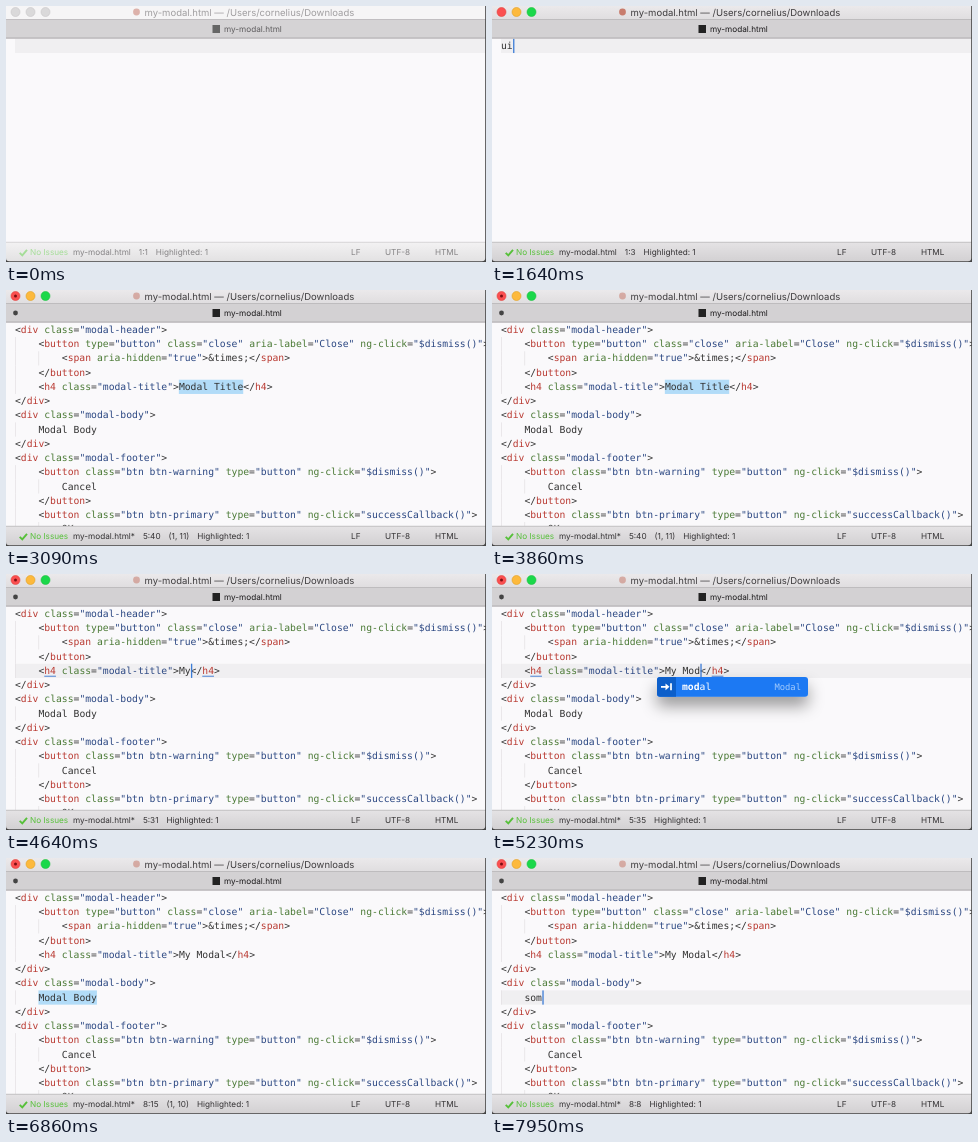
An HTML page that plays this animation: 480 px wide and 256 px high, repeating every 8 s.

```html
<!DOCTYPE html>
<html lang="en">
<head>
<meta charset="utf-8">
<title>Editor snippet demo</title>
<style>
html, body { margin: 0; width: 100%; height: 100%; overflow: hidden; background: #faf9fb; }
svg { display: block; width: 100vw; height: 100vh; }
text { white-space: pre; text-rendering: geometricPrecision; }
.ui { font: 8.2px Inter, sans-serif; }
.title { font: 9.5px Inter, sans-serif; }
.code { font: 9.72px "DejaVu Sans Mono", monospace; }
</style>
</head>
<body>
<svg id="stage" viewBox="0 0 480 256" xmlns="http://www.w3.org/2000/svg">
  <defs>
    <linearGradient id="titleFill" x2="0" y2="1">
      <stop stop-color="#ebe9eb"/><stop offset="1" stop-color="#dfdddf"/>
    </linearGradient>
    <linearGradient id="statusFill" x2="0" y2="1">
      <stop stop-color="#e5e3e5"/><stop offset="1" stop-color="#d2d0d2"/>
    </linearGradient>
    <linearGradient id="idleFill" x2="0" y2="1">
      <stop stop-color="#f3f2f3"/><stop offset="1" stop-color="#e2e1e2"/>
    </linearGradient>
    <filter id="shadow" x="-20%" y="-100%" width="140%" height="420%">
      <feDropShadow dx="0" dy="9" stdDeviation="8" flood-opacity=".4"/>
    </filter>
  </defs>
  <g id="editor"></g>
  <g id="chrome"></g>
  <path d="M0 0H480V256H0ZM0 0V252q0 3.2 3.2 3.2H476q3.2 0 3.2-3.2V0Z" fill="#444" fill-rule="evenodd"/>
</svg>
<script>
const LOOP = 8000, LEFT = 9, TOP = 32.8, ROW = 14.23, CW = 5.852;
const FOCUS = 500, EXPAND = 2760, NEXT_STOP = 6480;

const trigger = { text: 'uibmo', at: [1500, 1600, 1800, 2010, 2190] };
const heading = { text: 'My Modal', at: [4400, 4530, 4660, 4820, 4960, 5120, 5330, 5470] };
const content = { text: 'som', at: [7560, 7720, 7880] };

const colors = { plain: '#333', tag: '#b93a32', attr: '#4b7a36', string: '#2b4782' };
const editor = document.getElementById('editor');
const chrome = document.getElementById('chrome');

const colX = col => LEFT + col * CW;
const rowY = row => TOP + row * ROW;
const escapeXml = s => s.replace(/&/g, '&amp;').replace(/</g, '&lt;').replace(/>/g, '&gt;');
const rect = (x, y, w, h, fill, extra = '') =>
  `<rect x="${x}" y="${y}" width="${w}" height="${h}" fill="${fill}" ${extra}/>`;
const text = (x, y, body, fill, cls = 'ui', extra = '') =>
  `<text x="${x}" y="${y}" fill="${fill}" class="${cls}" ${extra}>${body}</text>`;
const span = (s, fill, extra = '') => `<tspan fill="${fill}" ${extra}>${escapeXml(s)}</tspan>`;

const typed = ({ text, at }, t) => text.slice(0, at.filter(time => time <= t).length);

const snippet = (title, body) => [
  '<div class="modal-header">',
  '    <button type="button" class="close" aria-label="Close" ng-click="$dismiss()">',
  '        <span aria-hidden="true">&times;</span>',
  '    </button>',
  `    <h4 class="modal-title">${title}</h4>`,
  '</div>',
  '<div class="modal-body">',
  `    ${body}`,
  '</div>',
  '<div class="modal-footer">',
  '    <button class="btn btn-warning" type="button" ng-click="$dismiss()">',
  '        Cancel',
  '    </button>',
  '    <button class="btn btn-primary" type="button" ng-click="successCallback()">',
  '        OK'
];

function highlight(line) {
  const token = /(<\/?)(\w+)|("[^"]*")|([\w-]+)(?==)|([^<"\w]+|\w+)/g;
  return line.replace(token, (all, open, tag, string, attr) => {
    if (tag) return span(open, colors.plain) + span(tag, colors.tag);
    if (string) return span(string, colors.string);
    return span(all, attr ? colors.attr : colors.plain);
  });
}

function stateAt(t) {
  const s = { active: t >= FOCUS, dirty: t >= 1720, lines: [''], row: 0, col: 0, selected: 0 };
  if (t < EXPAND) {
    s.lines = [typed(trigger, t)];
    s.col = s.lines[0].length;
    if (t >= 1900) s.popup = { row: 0, x: 0, width: 244.5, match: s.lines[0].length };
  } else {
    const title = typed(heading, t), body = typed(content, t);
    s.lines = snippet(title || 'Modal Title', body || 'Modal Body');
    if (t < NEXT_STOP) {
      s.row = 4;
      s.col = 28 + (title || 'Modal Title').length;
      s.selected = title ? 0 : 11;
      if (t >= 5180 && t < 5800) s.popup = { row: 4, x: 165, width: 151, match: title.length - 3 };
    } else {
      s.row = 7;
      s.col = 4 + (body || 'Modal Body').length;
      s.selected = body ? 0 : 10;
    }
  }
  const keys = [FOCUS, EXPAND, NEXT_STOP, ...trigger.at, ...heading.at, ...content.at];
  const last = Math.max(0, ...keys.filter(k => k <= t));
  s.caret = s.active && !s.selected && (t - last) % 800 < 400;
  return s;
}

function drawPopup({ row, x, width, match }) {
  const y = rowY(row + 1) - 0.9, h = 19.8, base = y + 12.9;
  const first = row === 0;
  const word = first ? 'uib-modal-template' : 'modal';
  const bold = first && match > 3 ? match + 1 : match;
  const label = span(word.slice(0, bold), '#fff', 'font-weight="bold"') + span(word.slice(bold), '#fff');
  const hint = first ? 'UI-Bootstrap Moda…' : 'Modal';
  return rect(x, y, width, h, '#1b79f3', 'rx="3" filter="url(#shadow)"') +
    `<path d="M${x + 19} ${y}h-16q-3 0-3 3v${h - 6}q0 3 3 3h16z" fill="#0d5fca"/>` +
    `<path d="M${x + 4} ${y + 9.8}h6M${x + 14} ${y + 6.3}v7" stroke="#fff" stroke-width="1.7"/>` +
    `<path d="M${x + 8.5} ${y + 6.4}l4 3.4-4 3.4z" fill="#fff"/>` +
    text(x + 25, base, label, '#fff', 'code') +
    text(x + width - (first ? 10 : 7), base, hint, '#a3cbfc', 'code', 'text-anchor="end" style="font-size:8.85px"');
}

function drawEditor(s) {
  let out = rect(0, 32, 480, 205, '#faf9fb');
  if (s.selected)
    out += rect(colX(s.col - s.selected), rowY(s.row), s.selected * CW, ROW, '#b2dcf8');
  else
    out += rect(LEFT, rowY(s.row), 471, ROW, '#f0eff1');
  s.lines.forEach((line, i) => {
    const indent = line.search(/\S|$/);
    for (let c = 0; c < indent; c += 4) out += rect(colX(c), rowY(i), 0.7, ROW, '#e2e0e3');
    out += text(LEFT, rowY(i) + 10.2, highlight(line), colors.plain, 'code');
  });
  if (s.row === 4 && !s.selected) {
    for (const c of [5, s.col + 2]) out += rect(colX(c), rowY(4) + 12, CW * 2, 1, '#4a83d4');
  }
  if (s.caret) out += rect(colX(s.col) + 0.4, rowY(s.row), 1.3, ROW, '#3c7cd6');
  if (s.popup) out += drawPopup(s.popup);
  return out;
}

function drawChrome(s) {
  const on = s.active;
  const ink = on ? '#3e3c3e' : '#a09ea0';
  const statusInk = on ? '#343234' : '#858385';
  const lights = on ? ['#fb4f50', '#fdb93c', '#1bd84a'] : ['#dad9da', '#dad9da', '#dad9da'];
  const rims = on ? ['#e0443f', '#dfa023', '#1cc040'] : ['#c8c7c8', '#c8c7c8', '#c8c7c8'];
  let out = rect(0, 0, 480, 14, on ? 'url(#titleFill)' : '#f6f5f6');
  lights.forEach((fill, i) => {
    out += `<circle cx="${9.5 + i * 15}" cy="6" r="4.5" fill="${fill}" stroke="${rims[i]}" stroke-width=".6"/>`;
  });
  if (s.dirty) out += '<circle cx="9.5" cy="6" r="1.5" fill="#7c0f12"/>';
  out += `<circle cx="130.5" cy="6" r="3.4" fill="#c4705f" opacity="${on && !s.dirty ? 0.9 : 0.5}"/>`;
  out += text(138.6, 9.6, 'my-modal.html — /Users/cornelius/Downloads', ink, 'title');

  out += rect(0, 13.5, 480, 18.5, on ? '#d3d1d3' : '#d5d3d5') +
    rect(0, 13, 480, 0.8, '#b8b6b8') + rect(0, 31.6, 480, 1, '#a7a5a7');
  if (s.dirty) out += '<circle cx="9.5" cy="23" r="2.4" fill="#444"/>';
  out += rect(206.5, 19, 7.5, 8, on ? '#222' : '#666') +
    text(218, 26, 'my-modal.html', on ? '#1c1a1c' : '#5f5d5f');

  out += rect(0, 236, 480, 20, on ? 'url(#statusFill)' : 'url(#idleFill)') +
    rect(0, 235.8, 480, 0.8, on ? '#bab8ba' : '#d0ced0');
  const green = on ? '#57c03a' : '#a5dd98';
  out += `<path d="M13.7 246.8l2.6 2.6 4.7-5.6" fill="none" stroke="${green}" stroke-width="1.9"/>` +
    text(24, 249.4, 'No Issues', green);
  const info = [`${s.row + 1}:${s.col + 1}`];
  if (s.selected) info.push(`(1, ${s.selected})`);
  info.push('Highlighted: 1');
  const file = 'my-modal.html' + (s.dirty ? '*' : '');
  out += text(67, 249.4, file + info.map(part => `<tspan dx="8">${part}</tspan>`).join(''), statusInk);
  [[345, 'LF'], [379, 'UTF-8'], [429, 'HTML']].forEach(([x, label]) => {
    out += text(x, 249.4, label, statusInk);
  });
  return out;
}

let shown = '';
function render(t) {
  const s = stateAt(t), key = JSON.stringify(s);
  if (key === shown) return;
  shown = key;
  editor.innerHTML = drawEditor(s);
  chrome.innerHTML = drawChrome(s);
}

const start = performance.now();
function tick() {
  render((performance.now() - start) % LOOP);
  requestAnimationFrame(tick);
}
tick();
</script>
</body>
</html>
```
